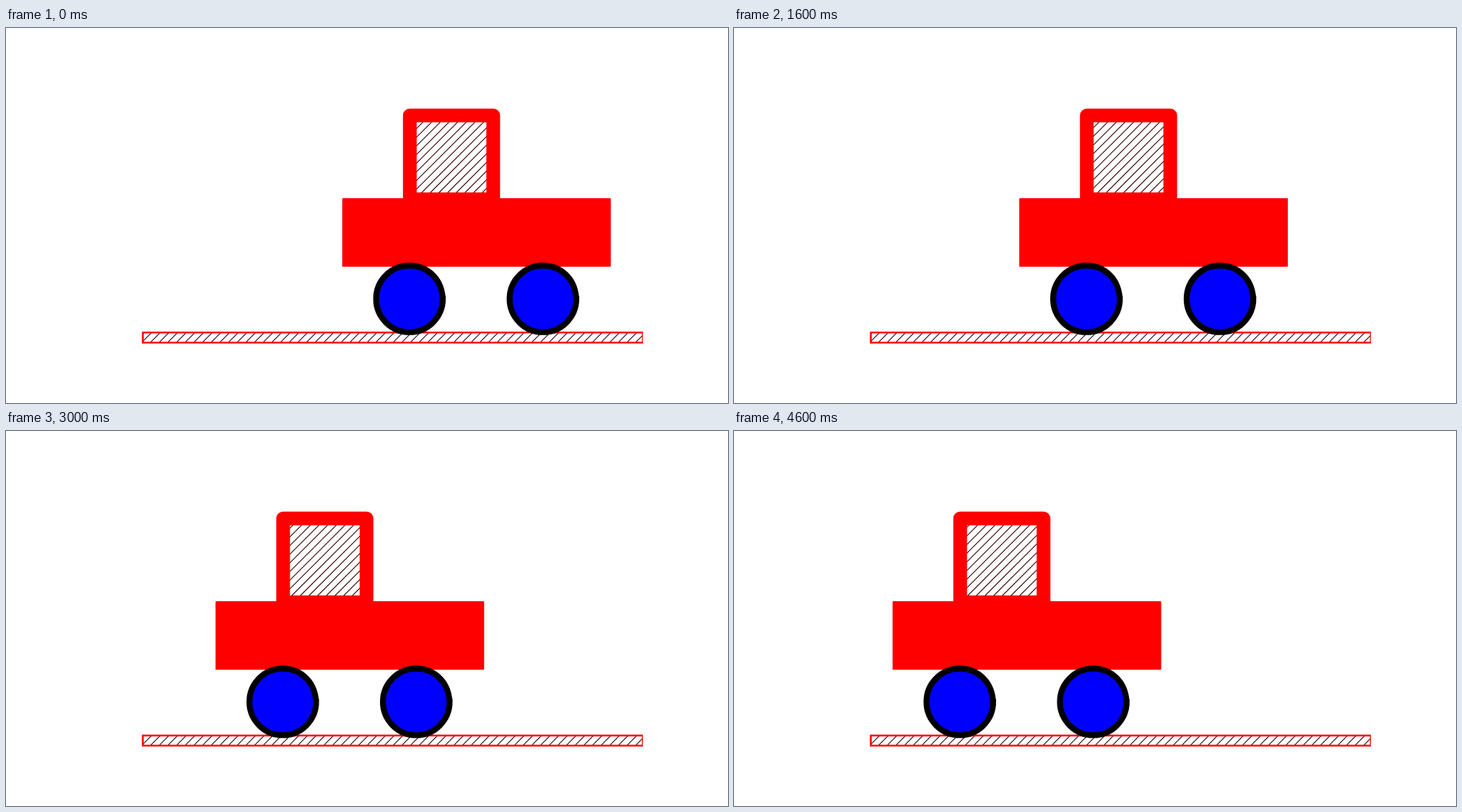
These frames come from a looping animation (1000x520 px, 5000 ms). An HTML page with a canvas:

```html
<!DOCTYPE html>
<html lang="en">
<head>
<meta charset="utf-8">
<title>Red car</title>
<style>
  html, body { margin: 0; height: 100%; overflow: hidden; background: #fff; }
  canvas { display: block; }
</style>
</head>
<body>
<canvas id="stage" width="1000" height="520"></canvas>
<script>
const ctx = document.getElementById("stage").getContext("2d");
const UNIT = 92.4;
const LOOP = 5000, STEP = 200, POSES = 24;
const START_X = 466.9, TRAVEL = 246.7;
const RED = "#f00", HATCH = "#300";

const smooth = u => u * u * (3 - 2 * u);

// Diagonal lines fixed to the page, seen through a rectangle.
function hatch(x, y, w, h, gap = 12) {
  ctx.save();
  ctx.beginPath();
  ctx.rect(x, y, w, h);
  ctx.clip();
  ctx.beginPath();
  for (let sum = Math.ceil((x + y) / gap) * gap; sum < x + y + w + h; sum += gap) {
    ctx.moveTo(sum - y, y);
    ctx.lineTo(sum - y - h, y + h);
  }
  ctx.strokeStyle = HATCH;
  ctx.lineWidth = 1.1;
  ctx.stroke();
  ctx.restore();
}

function outline(x, y, w, h, lineWidth) {
  ctx.beginPath();
  ctx.moveTo(x, y + h);
  ctx.lineTo(x + w, y + h);
  ctx.lineTo(x + w, y);
  ctx.lineTo(x, y);
  ctx.lineTo(x, y + h);
  ctx.lineCap = "square";
  ctx.lineJoin = "round";
  ctx.lineWidth = lineWidth;
  ctx.strokeStyle = RED;
  ctx.stroke();
}

function wheel(x) {
  ctx.beginPath();
  ctx.arc(x, 375.6, UNIT / 2, 0, 2 * Math.PI);
  ctx.fillStyle = "#00f";
  ctx.fill();
  ctx.strokeStyle = "#000";
  ctx.lineWidth = 8.1;
  ctx.stroke();
}

function road() {
  const box = [189.5, 422.3, 7.5 * UNIT - 0.5, 14];
  ctx.save();
  ctx.beginPath();
  ctx.rect(0, 0, 882, 520);
  ctx.clip();
  hatch(...box);
  outline(...box, 2.5);
  ctx.restore();
}

function car(x) {
  const cab = [x + UNIT, 121.3, 1.25 * UNIT, 116.2];
  const body = [x, 237.3, 4 * UNIT, UNIT];
  hatch(...cab);
  outline(...cab, 19);
  ctx.fillStyle = RED;
  ctx.fillRect(...body);
  outline(...body, 2.4);
  wheel(x + UNIT - 0.5);
  wheel(x + 3 * UNIT - 0.4);
}

function draw(now) {
  const pose = Math.min(POSES - 1, Math.floor(now % LOOP / STEP));
  ctx.fillStyle = "#fff";
  ctx.fillRect(0, 0, 1000, 520);
  road();
  const progress = smooth((pose + 0.5) / POSES) - smooth(0.5 / POSES);
  car(START_X - TRAVEL * progress);
}

let start;
function tick(now) {
  start ??= now;
  draw(now - start);
  requestAnimationFrame(tick);
}
draw(0);
requestAnimationFrame(tick);
</script>
</body>
</html>
```
